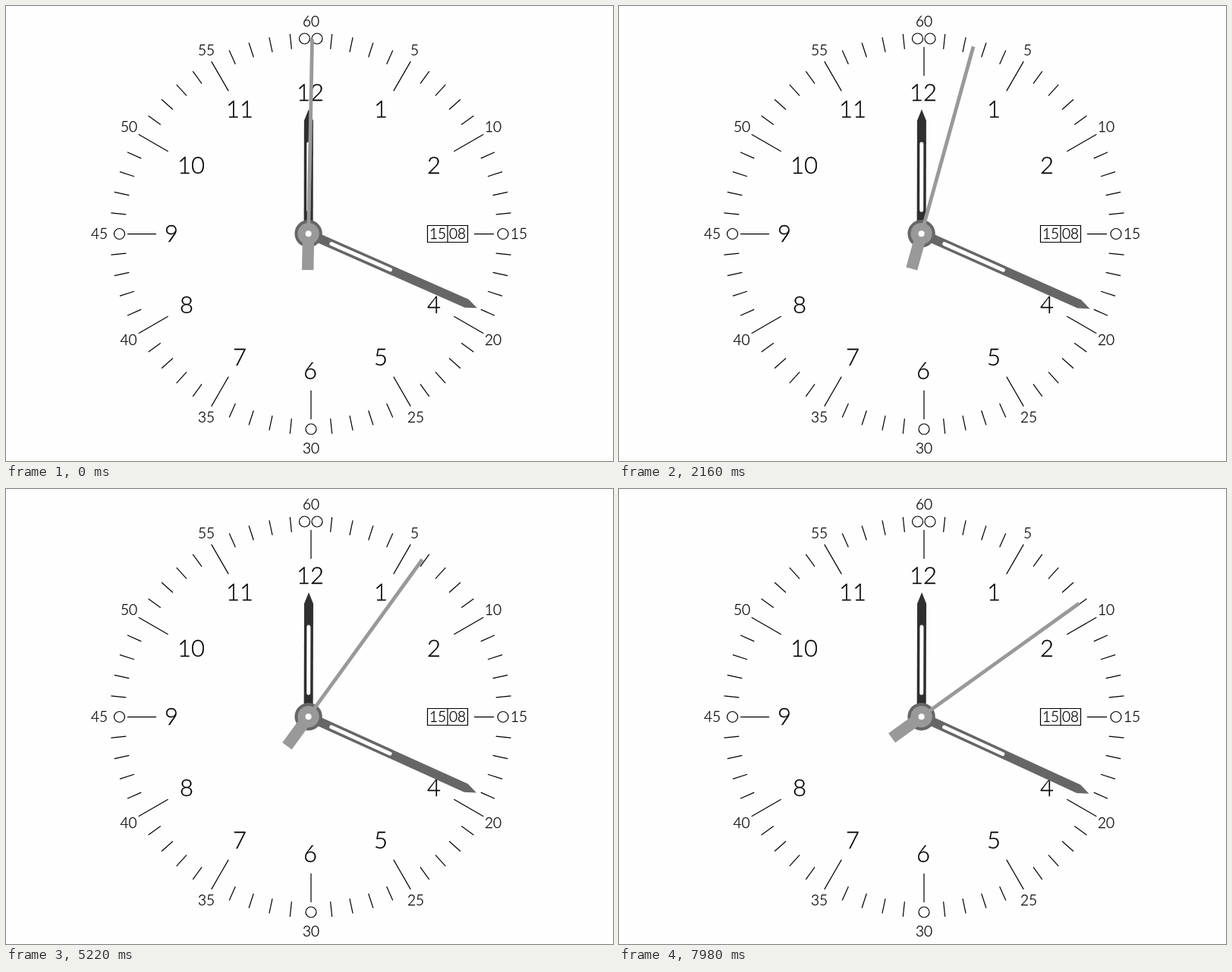
Write an HTML page that moves like this. It is 800x600 px and loops after 8 s.

```html
<!DOCTYPE html>
<html lang="en">
<head>
<meta charset="utf-8">
<title>Watch dial</title>
<style>
  html, body { margin: 0; height: 100%; overflow: hidden; background: #fefefe; }
  svg { display: block; width: 800px; height: 600px; }
  #dial { stroke: #000; stroke-width: 1.2; fill: none; }
  text { font-family: Lato, sans-serif; font-weight: 300; text-anchor: middle; fill: #000; stroke-width: .3; }
</style>
</head>
<body>
<svg viewBox="0 0 800 600">
  <g id="dial">
    <path d="M402 54V92M402 507V545M160 300.7H198M617 300.7H643"/>
    <circle cx="393.5" cy="43" r="7"/>
    <circle cx="410" cy="43" r="7"/>
    <circle cx="402" cy="558" r="7"/>
    <circle cx="149.5" cy="300.5" r="7"/>
    <circle cx="655" cy="300.5" r="7"/>
    <path d="M555.5 289.5H608.5V311.5H555.5ZM582 289.5V311.5"/>
  </g>
  <g transform="translate(398.6 300.2)">
    <g id="hour">
      <path d="M0 -164L6 -149V0H-6V-149Z" fill="#2f2f2f"/>
      <path d="M0 -118.5V-31" stroke="#fff" stroke-width="5" stroke-linecap="round"/>
    </g>
    <g id="minute" fill="#666">
      <path d="M0 -243L6 -228V0H-6V-228Z"/>
      <circle r="18.2"/>
      <path d="M0 -118V-33" stroke="#fff" stroke-width="5" stroke-linecap="round"/>
    </g>
    <g id="second" fill="#999">
      <path d="M-2.4 -256H2.4V0H7.7V48H-7.7V0H-2.4Z"/>
      <circle r="14.2"/>
    </g>
    <circle r="4" fill="#fff"/>
  </g>
</svg>
<script>
const dial = document.getElementById('dial');

function add(name, attributes) {
  const node = document.createElementNS('http://www.w3.org/2000/svg', name);
  for (const key in attributes) node.setAttribute(key, attributes[key]);
  return dial.appendChild(node);
}

function label(value, x, y, size) {
  add('text', { x, y: y + size * 0.36, 'font-size': size, stroke: '#000' }).textContent = value;
}

for (let minute = 0; minute < 60; minute++) {
  if (minute % 15 === 0) continue;
  const [inner, outer] = minute % 5 ? [245, 265] : [217.5, 262.5];
  add('path', {
    d: `M0 ${-inner}V${-outer}`,
    transform: `translate(402 300.5) rotate(${minute * 6})`
  });
}

const hours = [
  [12, 401, 114], [1, 494, 136], [2, 564, 210], [4, 564, 394],
  [5, 494, 463], [6, 401, 481], [7, 308, 463], [8, 238, 394],
  [9, 218, 300], [10, 244, 210], [11, 308, 136]
];
const minutes = [
  [60, 402, 20], [5, 538.5, 58], [10, 642, 159], [15, 676, 300],
  [20, 642, 440], [25, 540, 542], [30, 402, 583], [35, 264, 542],
  [40, 161.5, 440], [45, 123, 300], [50, 162, 159], [55, 264, 58]
];
const date = [['15', 569, 300.5], ['08', 595, 300.5]];
for (const item of hours) label(...item, 31);
for (const item of [...minutes, ...date]) label(...item, 19);

function turn(id, angle) {
  document.getElementById(id).setAttribute('transform', `rotate(${angle})`);
}

function draw() {
  const step = Math.floor(performance.now() % 8000 / 30);
  const sweep = step * 0.2;
  turn('second', 1.1 + sweep);
  turn('minute', 113.8 + sweep / 60);
  turn('hour', 0.1 + sweep / 720);
  requestAnimationFrame(draw);
}
draw();
</script>
</body>
</html>
```
